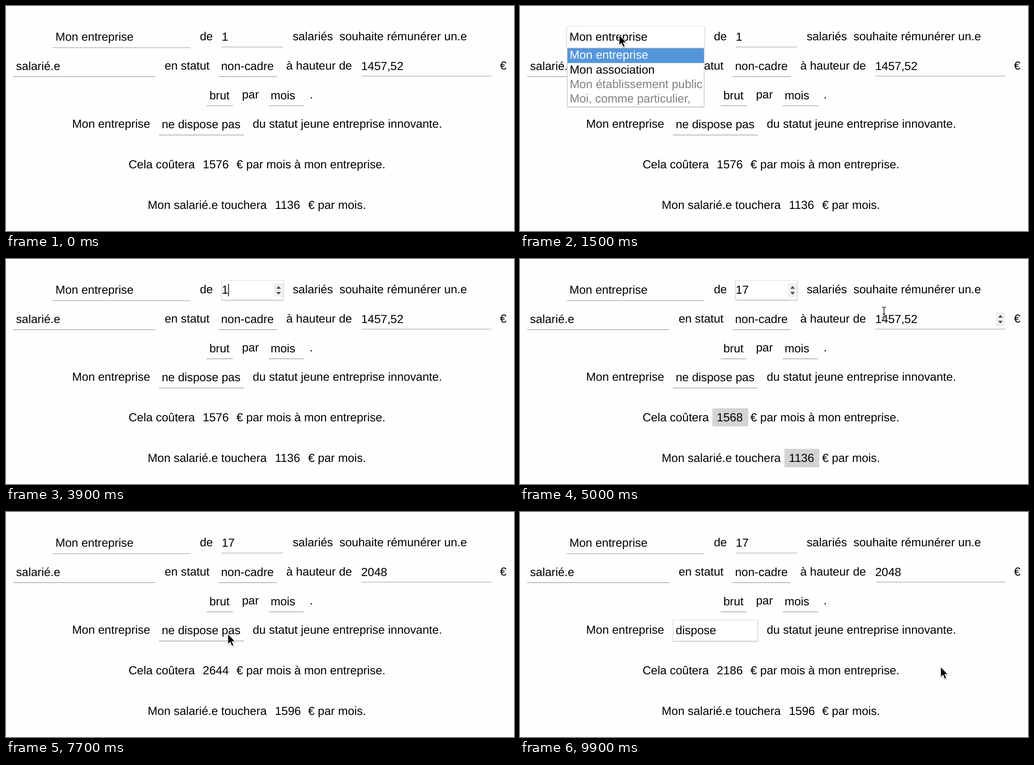
An HTML page for the animation above (10000 ms loop, 1122 by 499 pixels).

```html
<!DOCTYPE html>
<html lang="fr">
<head>
<meta charset="utf-8">
<title>Simulateur de salaire</title>
<style>
  html, body { margin: 0; width: 100%; height: 100%; overflow: hidden; background: #fefefd; }
  svg { display: block; width: 1122px; height: 499px; }
  text {
    font: 25.85px "Liberation Sans", Arial, sans-serif;
    text-rendering: geometricPrecision;
    white-space: pre;
  }
  .lines { stroke: #939393; stroke-width: 1.2; }
  .focus { fill: #fff; stroke: #dedede; filter: drop-shadow(0 1px 1px #bbb); }
  .list { fill: #fff; stroke: #bdbdbd; filter: drop-shadow(0 1px 1px #ccc); }
  .list ~ text { font-size: 26px; }
  .hot { fill: #5596db; }
  .light { fill: #fff; }
  .off { fill: #808080; }
  .chip { fill: #d3d3d3; }
  .selection { fill: #b3d7ff; }
  .caret { stroke: #000; stroke-width: 1.6; }
  #arrow { filter: drop-shadow(0 1px 1px rgba(0, 0, 0, .4)); }
  .halo { stroke: #fff; stroke-width: 3.6; }
  .stem { stroke: #222; stroke-width: 1.6; }
</style>
</head>
<body>
<svg viewBox="0 0 1122 499">
  <defs>
    <g id="spinner">
      <rect width="20" height="30" fill="#efefef"/>
      <path d="M5 12l5-6 5 6zM5 19l5 6 5-6z" fill="#4a4a4a"/>
    </g>
    <path id="beam" fill="none" d="M-4.5 -11.5Q0 -11.5 0 -8V8Q0 11.5 -4.5 11.5M4.5 -11.5Q0 -11.5 0 -8M0 8Q0 11.5 4.5 11.5M-3 4H3"/>
  </defs>

  <path class="lines" d="M103 92.5H407M476 91H612M16 156.7H330M469 156.7H598M785 155.5H1072M443 221.3H501M580 221.3H658M338 286.2H525"/>

  <!-- focused fields -->
  <rect class="focus" x="103.5" y="45.5" width="304" height="47" data-on="700-2500"/>
  <rect class="focus" x="476.5" y="47.5" width="136" height="43" data-on="2500-5300"/>
  <rect class="focus" x="784.5" y="111.5" width="287" height="43.5" data-on="5300-6100"/>
  <rect class="focus" x="338.5" y="239.5" width="186.5" height="46.5" data-on="7900-10000"/>
  <use href="#spinner" x="592" y="54" data-on="2300-5300"/>
  <use href="#spinner" x="1051" y="118" data-on="4800-6100"/>
  <rect class="selection" x="785" y="119" width="93" height="29" data-on="5500-5700"/>

  <!-- sentence -->
  <text x="109.2" y="77">Mon entreprise</text>
  <text x="428.2" y="76">de</text>
  <text x="476.5" y="77" data-on="0-4100">1</text>
  <text x="476.5" y="77" data-on="4100-10000">17</text>
  <text x="633.2" y="76">salariés</text>
  <text x="736.5" y="76">souhaite rémunérer un.e</text>

  <text x="22.2" y="142">salarié.e</text>
  <text x="350.4" y="141">en statut</text>
  <text x="475" y="142">non-cadre</text>
  <text x="619" y="141">à hauteur de</text>
  <text x="784.4" y="142" data-on="0-5700">1457,52</text>
  <text x="784.4" y="142" data-on="5700-5800">20</text>
  <text x="784.4" y="142" data-on="5800-10000">2048</text>
  <text x="1091" y="141">€</text>

  <text x="449.2" y="207">brut</text>
  <text x="521.2" y="205">par</text>
  <text x="584.4" y="207">mois</text>
  <text x="670.5" y="205">.</text>

  <text x="146" y="270">Mon entreprise</text>
  <text x="344" y="271" data-on="0-8500">ne dispose pas</text>
  <text x="344" y="271" data-on="8500-10000">dispose</text>
  <text x="545" y="270">du statut jeune entreprise innovante.</text>

  <!-- results -->
  <rect class="chip" x="425" y="331" width="79" height="40"/>
  <rect class="chip" x="584" y="421" width="77" height="41"/>
  <text x="270.7" y="360">Cela coûtera</text>
  <text x="434.6" y="360" data-on="0-4700">1576</text>
  <text x="434.6" y="360" data-on="4700-6600">1568</text>
  <text x="434.6" y="360" data-on="6600-9100">2644</text>
  <text x="434.6" y="360" data-on="9100-10000">2186</text>
  <text x="509" y="360">€ par mois à mon entreprise.</text>
  <text x="313" y="450">Mon salarié.e touchera</text>
  <text x="594" y="450" data-on="0-6600">1136</text>
  <text x="594" y="450" data-on="6600-10000">1596</text>
  <text x="667.3" y="450">€ par mois.</text>

  <!-- carets -->
  <path class="caret" d="M491.5 55V83" data-on="2500-3000 3500-4000"/>
  <path class="caret" d="M506 55V83" data-on="4100-4600"/>
  <path class="caret" d="M814 119V148" data-on="5700-5800"/>
  <path class="caret" d="M843.3 119V148" data-on="5800-6100"/>

  <!-- drop-down lists -->
  <g data-on="900-1700">
    <rect class="list" x="104.5" y="93.5" width="302" height="130"/>
    <rect class="hot" x="105" y="94" width="301" height="32.5"/>
    <text class="light" x="109.7" y="117">Mon entreprise</text>
    <text x="109.7" y="150">Mon association</text>
    <text class="off" x="109.7" y="182">Mon établissement public</text>
    <text class="off" x="109.7" y="214">Moi, comme particulier,</text>
  </g>
  <g data-on="8000-8500">
    <rect class="list" x="338.5" y="287.5" width="186" height="67"/>
    <rect class="hot" x="339" y="288" width="185" height="32.5" data-on="8000-8200"/>
    <rect class="hot" x="339" y="321" width="185" height="33" data-on="8200-8500"/>
    <text x="344" y="311">ne dispose pas</text>
    <text x="344" y="344">dispose</text>
    <text class="light" x="344" y="311" data-on="8000-8200">ne dispose pas</text>
    <text class="light" x="344" y="344" data-on="8200-8500">dispose</text>
  </g>

  <g id="pointer">
    <path id="arrow" data-on="100-3200 4300-4900 5800-10000" d="M0 0V23.5L5.2 18.7 9 27.5 13 25.8 9.3 17.3H16.5Z" stroke="#fff" stroke-width="1.4"/>
    <g data-on="4900-5700">
      <use href="#beam" class="halo"/>
      <use href="#beam" class="stem"/>
    </g>
  </g>
</svg>
<script>
  const LOOP = 10000, STEP = 100;

  // Pointer stops: time, x, y
  const path = [
    [100, 330, 190], [700, 232, 70], [1100, 228, 68], [1500, 219, 64], [1700, 224, 66],
    [2100, 589, 68], [2400, 653, 70], [2700, 614, 58], [3000, 617, 58], [4300, 620, 62],
    [5000, 804, 118], [5300, 806, 133], [5700, 806, 133], [5800, 804, 157], [6100, 796, 190],
    [6600, 790, 194], [7600, 490, 268], [7700, 490, 270], [8000, 482, 272], [8300, 466, 336],
    [8500, 451, 325], [8600, 451, 325], [8900, 638, 281], [9800, 638, 281], [9900, 929, 343]
  ];
  const flashes = [4700, 6600, 9100];

  const timed = [...document.querySelectorAll("[data-on]")].map(el => ({
    el, spans: el.dataset.on.split(" ").map(s => s.split("-").map(Number))
  }));
  const chips = document.querySelectorAll(".chip");
  const pointer = document.getElementById("pointer");

  function pointerAt(t) {
    const i = path.findIndex(p => p[0] > t);
    const b = path[i < 0 ? path.length - 1 : i];
    const a = i < 0 ? b : path[Math.max(0, i - 1)];
    const k = a === b ? 0 : (t - a[0]) / (b[0] - a[0]);
    return [1, 2].map(n => a[n] + (b[n] - a[n]) * k);
  }

  function flashAt(t) {
    const age = Math.min(...flashes.map(f => t < f ? Infinity : t - f));
    return age < 200 ? 0.5 : age < 600 ? 1 : 0;
  }

  function draw(t) {
    for (const { el, spans } of timed) {
      const on = spans.some(([from, to]) => t >= from && t < to);
      el.style.display = on ? "" : "none";
    }
    chips.forEach(chip => { chip.style.opacity = flashAt(t); });
    pointer.setAttribute("transform", `translate(${pointerAt(t)})`);
  }

  const start = performance.now();
  function tick() {
    const t = (performance.now() - start) % LOOP;
    draw(Math.floor(t / STEP) * STEP);
    requestAnimationFrame(tick);
  }
  draw(0);
  requestAnimationFrame(tick);
</script>
</body>
</html>
```
